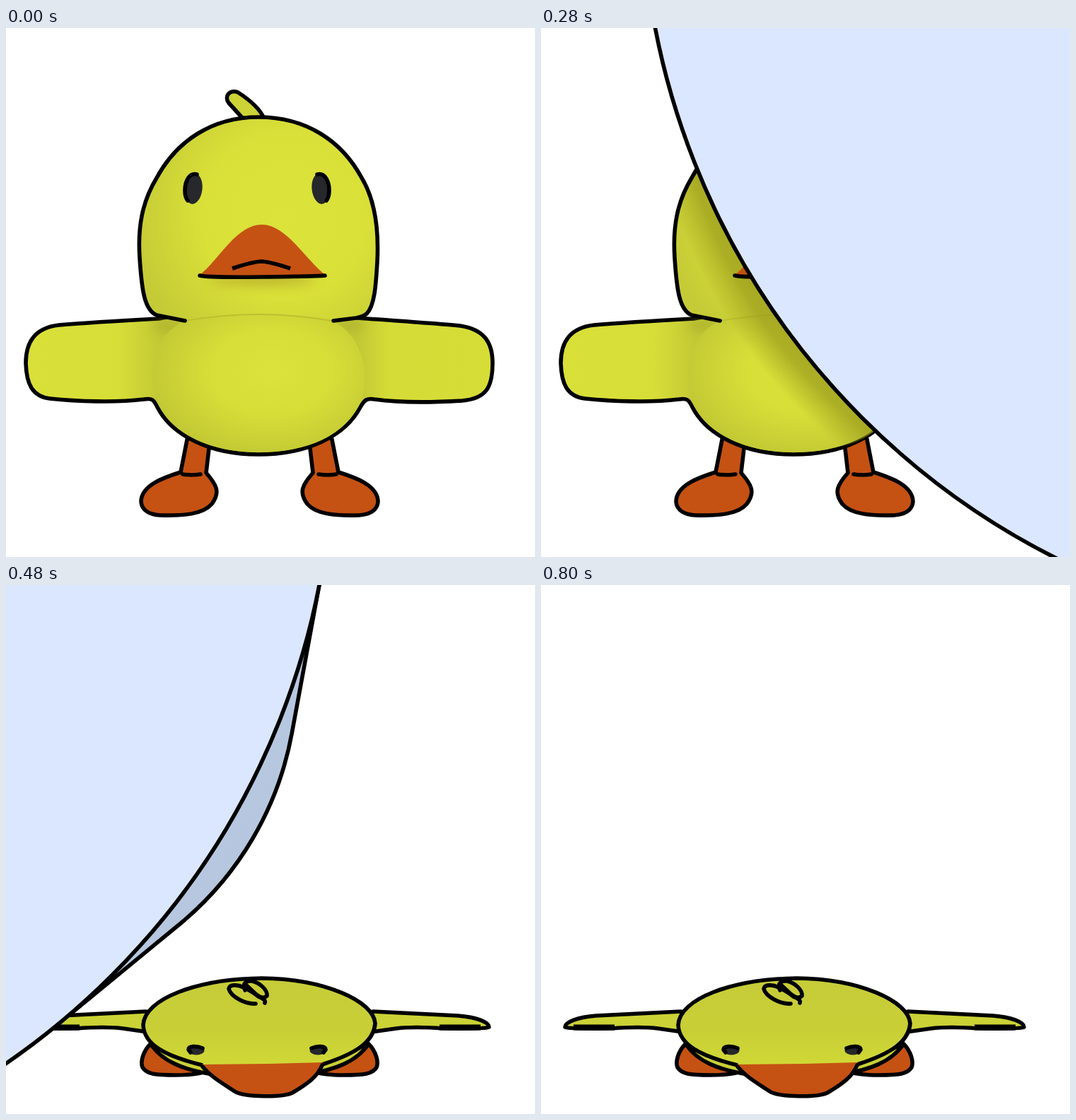
Write an HTML page that moves like this. It is 748 px wide and 748 px high and loops after 1640 ms.

```html
<!DOCTYPE html>
<html lang="en">
<head>
<meta charset="utf-8">
<title>Duck and roller</title>
<style>
  html, body { margin: 0; width: 100%; height: 100%; overflow: hidden; background: #fff; }
  svg { display: block; width: 100vw; height: 100vh; }
  .line { fill: none; stroke: #000; stroke-width: 5.6; stroke-linecap: round; stroke-linejoin: round; }
  .flat { stroke-linecap: butt; }
  .edge { stroke: #000; stroke-width: 5.6; stroke-linejoin: round; }
  .orange { fill: #c55213; }
  .eye { fill: #26282c; }
</style>
</head>
<body>
<svg viewBox="0 0 748 748">
  <defs>
    <radialGradient id="headFill" gradientUnits="userSpaceOnUse" cx="395" cy="265" r="215">
      <stop offset="0" stop-color="#dce33a"/>
      <stop offset=".55" stop-color="#d9e038"/>
      <stop offset="1" stop-color="#c5cb36"/>
    </radialGradient>
    <radialGradient id="bellyFill" gradientUnits="userSpaceOnUse" cx="375" cy="485" r="172" gradientTransform="translate(0 146) scale(1 .7)">
      <stop offset="0" stop-color="#dbe23a"/>
      <stop offset=".5" stop-color="#d7de38"/>
      <stop offset="1" stop-color="#c3c934"/>
    </radialGradient>
    <linearGradient id="armFill" gradientUnits="userSpaceOnUse" x1="28" y1="0" x2="688" y2="0">
      <stop offset="0" stop-color="#d9e038"/>
      <stop offset=".2" stop-color="#d7de38"/>
      <stop offset=".29" stop-color="#c2c834"/>
      <stop offset=".71" stop-color="#c2c834"/>
      <stop offset=".78" stop-color="#d5dc37"/>
      <stop offset="1" stop-color="#d6dd37"/>
    </linearGradient>
    <linearGradient id="flatFill" x1="0" y1="0" x2="0" y2="1">
      <stop offset="0" stop-color="#c6cc38"/>
      <stop offset=".6" stop-color="#c8cf36"/>
      <stop offset="1" stop-color="#d0d836"/>
    </linearGradient>
    <linearGradient id="sideFill" gradientUnits="userSpaceOnUse" x1="60" y1="0" x2="700" y2="450">
      <stop offset="0" stop-color="#bdcdec"/>
      <stop offset=".5" stop-color="#b6c7e0"/>
      <stop offset="1" stop-color="#b3c3d5"/>
    </linearGradient>
    <radialGradient id="shadeFill" gradientUnits="userSpaceOnUse" r="748">
      <stop offset=".9" stop-color="#9a9b1c" stop-opacity=".8"/>
      <stop offset=".945" stop-color="#9a9b1c" stop-opacity=".7"/>
      <stop offset="1" stop-color="#9a9b1c" stop-opacity="0"/>
    </radialGradient>
    <filter id="soft" x="-50%" y="-100%" width="200%" height="300%"><feGaussianBlur stdDeviation="8"/></filter>
    <filter id="wide" filterUnits="userSpaceOnUse" x="0" y="0" width="748" height="748"><feGaussianBlur stdDeviation="11"/></filter>
    <path id="head" d="M213 407C196 399 192 372 189 325C186 280 193 245 213 212C241 160 291 126 357 126C425 126 475 160 503 212C523 245 527 290 525 330C523 365 521 393 510 404Q505 408 497 410L461 414Q357 396 253 414Z"/>
    <path id="body" d="M216 411C160 414 110 417 75 420C40 424 28 445 28 474C29 505 38 521 62 524C100 528 155 530 195 525C207 523 209 526 214 536C235 577 290 603 357 603C425 603 480 577 501 536C507 526 510 523 521 525C565 531 610 529 645 527C679 524 688 508 688 474C688 442 674 426 642 421C600 417 550 414 497 410L461 404H253Z"/>
    <clipPath id="skin"><use href="#head"/><use href="#body"/></clipPath>
    <clipPath id="outside"><path id="outsidePath" clip-rule="evenodd"/></clipPath>
    <clipPath id="onSide"><path id="sideClip"/></clipPath>
    <g id="foot">
      <path class="orange edge" d="M258 572L247 628C225 635 191 646 191 670C192 682 203 688 218 689C253 690 279 687 291 673C304 656 297 645 283 629L288 586Z"/>
      <path class="line" d="M250 631Q262 633 275 631"/>
    </g>
    <g id="eye">
      <ellipse class="eye" cx="265.5" cy="227.5" rx="12" ry="21.5" transform="rotate(7 265.5 227.5)"/>
      <path class="line" d="M270 207C259 204 253 217 253 230Q253 239 257 244"/>
    </g>
    <g id="flatSide">
      <path d="M198 603L78 609C52 611 34 618 34 625Q38 628 100 627Q140 624 165 628L200 632Z" fill="#cbd236"/>
      <path class="line" d="M198 603L78 609C52 611 34 618 34 625Q38 628 100 627Q140 624 165 627L200 632"/>
      <path class="line flat" d="M46 625.5H104" style="stroke-width:8"/>
      <path class="orange edge" d="M205 648C193 660 190 675 193 682C199 692 212 693 240 693C262 693 270 691 290 687Z"/>
      <path class="edge" d="M205 650C222 674 250 685 292 692L285 678Z" fill="#c8cf36"/>
    </g>
    <g id="flatEye">
      <ellipse class="eye" cx="269" cy="658" rx="11.5" ry="6.5"/>
      <path class="line" d="M278 655C269 651 258 652 258 657L261 661"/>
    </g>
  </defs>

  <path id="side" class="edge" fill="url(#sideFill)"/>
  <g id="contact" clip-path="url(#onSide)">
    <path id="contactPath" fill="none" stroke="#74775a" stroke-width="30" stroke-opacity=".65" filter="url(#wide)"/>
  </g>

  <g id="standing" clip-path="url(#outside)">
    <use href="#foot"/>
    <use href="#foot" transform="matrix(-1 0 0 1 717 0)"/>
    <path class="edge" d="M335 128L315 106C308 97 316 86 328 91C342 100 358 112 365 128" fill="#ccd336"/>
    <use href="#body" class="edge" fill="url(#armFill)"/>
    <g fill="#a0a22a" opacity=".6" filter="url(#soft)">
      <ellipse cx="230" cy="421" rx="24" ry="7"/>
      <ellipse cx="487" cy="421" rx="22" ry="6"/>
    </g>
    <path d="M253 414Q357 396 461 414C500 432 515 480 503 526C480 578 425 600 357 600C290 600 236 576 213 528C198 480 213 432 253 414Z" fill="url(#bellyFill)"/>
    <use href="#head" fill="url(#headFill)"/>
    <path d="M253 414Q357 396 461 414" fill="none" stroke="#bcc030" stroke-width="2"/>
    <ellipse cx="362" cy="356" rx="76" ry="8" fill="#b3a52c" opacity=".75" filter="url(#soft)"/>
    <circle id="shade" r="748" fill="url(#shadeFill)" clip-path="url(#skin)"/>
    <path class="line" d="M253 414L213 406C196 399 192 372 189 325C186 280 193 245 213 212C241 160 291 126 357 126C425 126 475 160 503 212C523 245 527 290 525 330C523 365 521 393 510 404Q505 408 495 410L463 414"/>
    <use href="#eye"/>
    <use href="#eye" transform="matrix(-1 0 0 1 710 0)"/>
    <path class="orange" d="M273 350C300 330 325 278 362 278C397 278 425 330 453 350L362 353Z"/>
    <path class="line" d="M274 350Q285 353 362 352Q440 351 451 350"/>
    <path class="line flat" d="M320 340Q350 330 362 330Q375 331 402 340"/>
  </g>

  <g id="squashed">
    <use href="#flatSide"/>
    <use href="#flatSide" transform="matrix(-1 0 0 1 717 0)"/>
    <path class="edge" d="M278 679C225 666 195 650 194 622C196 585 270 557 362 556C450 557 520 588 522 620C520 645 497 662 447 678" fill="url(#flatFill)"/>
    <path class="line" d="M353 592C338 593 318 582 315 571C316 564 328 565 336 569Q350 576 357 582Q368 586 366 591"/>
    <path class="line" d="M338 573C333 563 340 559 348 560C360 563 370 573 369 581C365 585 359 583 354 579L340 566"/>
    <use href="#flatEye"/>
    <use href="#flatEye" transform="matrix(-1 0 0 1 710 0)"/>
    <path class="orange" d="M276 678Q362 678 448 675C440 694 425 706 405 718C390 725 340 725 325 718C310 708 290 697 276 678Z"/>
    <path class="line" d="M278 681C290 696 310 707 325 717C340 724 390 725 405 718C425 706 440 696 447 679"/>
  </g>

  <circle id="front" class="edge" fill="#dbe7ff"/>
  <g id="marks" class="line flat">
    <path d="M627.5 526.5L638 526"/>
    <path d="M458.5 628.5V634" style="stroke-width:4"/>
  </g>
</svg>
<script>
const LOOP = 1640, STEP = 40;
const VANISH = 374, RADIUS = 457, RISE = 247;
const MID = 1.46, NEAR = 2.33;
const el = id => document.getElementById(id);
const set = (id, attrs) => { for (const k in attrs) el(id).setAttribute(k, attrs[k]); };
const show = (id, on) => set(id, { visibility: on ? "visible" : "hidden" });

// Centre of the roller's far end: eased travel, symmetric about 400 ms
function rollerX(t) {
  const n = (t - 400) / STEP, m = n * n;
  return 270.3 - n * (157.75 - 0.7792 * (m - 4) + 0.00248 * (m - 4) * (m - 16));
}

// Cross-section of the roller at a perspective scale
function slice(x, scale) {
  return { x: VANISH + (x - VANISH) * scale, y: VANISH - RISE * scale, r: RADIUS * scale };
}

const at = (c, a) => (c.x + c.r * Math.cos(a)).toFixed(1) + " " + (c.y + c.r * Math.sin(a)).toFixed(1);

// Point on a slice's left edge at height y
const leftAt = (c, y) => at(c, Math.PI - Math.asin((y - c.y) / c.r));

// Far arc and its two tangents, running to the near end
function sidePath(far, near) {
  const dx = VANISH - far.x, dy = VANISH - far.y, d = Math.hypot(dx, dy);
  if (d <= far.r) return "";
  const mid = Math.atan2(dy, dx), half = Math.acos(far.r / d);
  const a = mid - half, b = mid + half;
  return `M${at(far, a)}A${far.r} ${far.r} 0 0 1 ${at(far, b)}L${at(near, b)}L${at(near, a)}Z`;
}

// Where the roller meets the duck: straight down the head, curved over the wing
function contactLine(c) {
  return `M${leftAt(c, 150)}L${leftAt(c, 370)}L${leftAt(c, 413)}A${c.r} ${c.r} 0 0 0 ${leftAt(c, 524)}`;
}

function draw(time) {
  const t = Math.min(800, Math.floor((time % LOOP) / STEP) * STEP);
  const rolling = t >= 80 && t <= 600, flat = t >= 360;
  const x = rollerX(t), far = slice(x, 1), mid = slice(x, MID), near = slice(x, NEAR);
  const side = rolling ? sidePath(far, near) : "";
  set("side", { d: side });
  set("sideClip", { d: side });
  show("side", side);
  show("front", rolling);
  set("front", { cx: near.x, cy: near.y, r: near.r });

  const line = contactLine(mid);
  const hole = rolling
    ? `${line}A${mid.r} ${mid.r} 0 0 0 ${mid.x} ${mid.y + mid.r}V-9L${leftAt(mid, -9)}Z` : "";
  set("outsidePath", { d: "M-9 -9H757V757H-9Z" + hole });
  set("shadeFill", { cx: mid.x, cy: mid.y });
  set("shade", { cx: mid.x, cy: mid.y });
  show("shade", rolling && !flat);

  set("contactPath", { d: line });
  show("contact", t === 240 || t === 280);
  show("standing", !flat);
  show("squashed", flat);
  show("marks", t === 320);
}

const start = performance.now();
function tick() {
  draw(performance.now() - start);
  requestAnimationFrame(tick);
}
tick();
</script>
</body>
</html>
```
